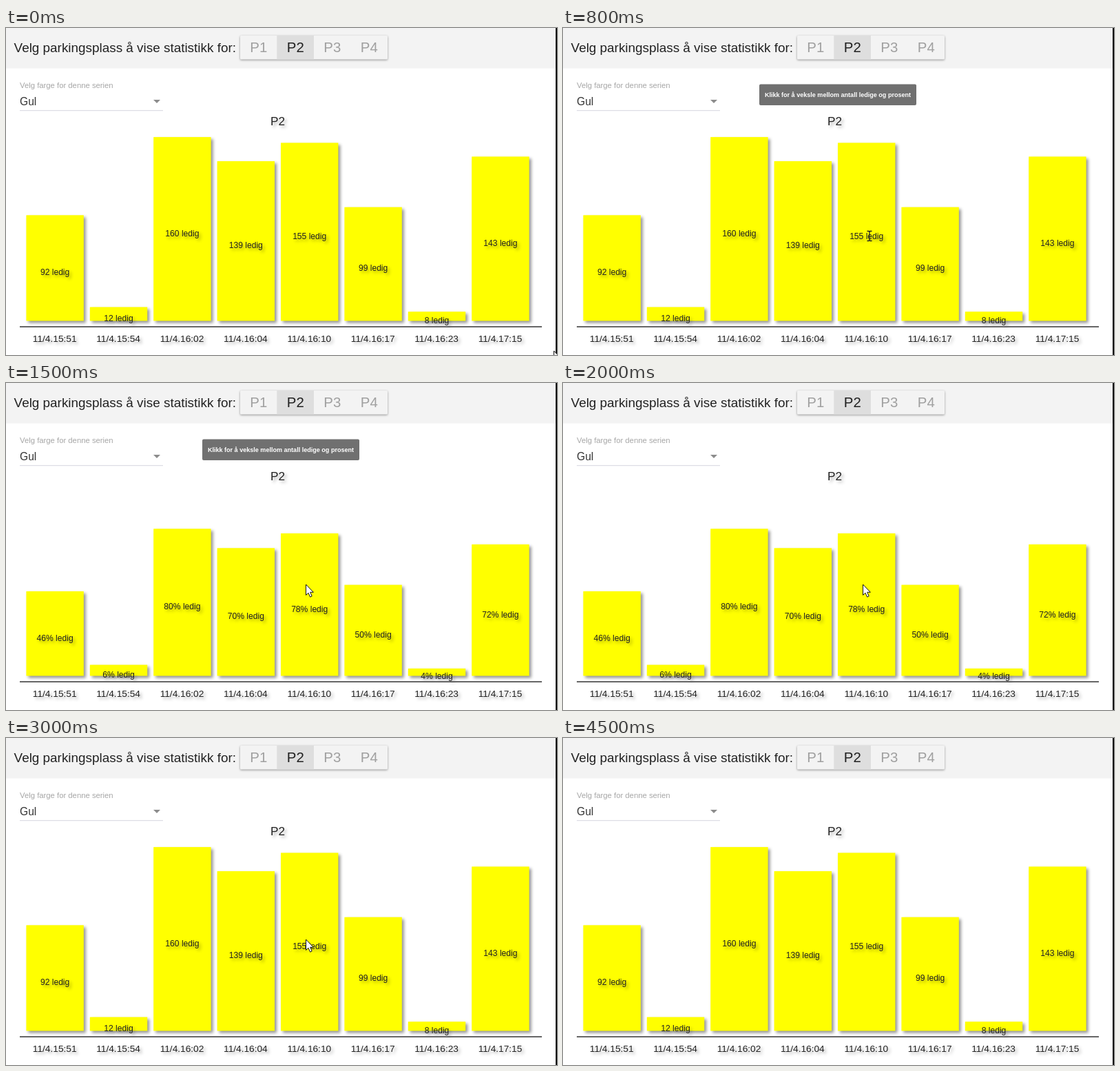
An HTML page that plays this animation: 800 by 474 pixels, repeating every 4600 ms.

```html
<!DOCTYPE html>
<html lang="no">
<head>
<meta charset="utf-8">
<title>Parkeringsstatistikk</title>
<style>
  html, body { margin: 0; width: 100%; height: 100%; overflow: hidden; background: #fff; }
  svg { display: block; font-family: "Liberation Sans", Arial, sans-serif; fill: #222; }
  .raised { filter: drop-shadow(0 1.5px 1.5px rgba(0, 0, 0, .4)); }
  .bar { fill: #ff0; filter: drop-shadow(3px 3px 2px rgba(0, 0, 0, .42)); }
  .soft { filter: drop-shadow(3px 3px 2px rgba(0, 0, 0, .32)); }
  .mid { text-anchor: middle; }
</style>
</head>
<body>
<svg id="stage" width="800" height="474" viewBox="0 0 800 474">
  <rect width="800" height="58.5" fill="#f3f3f3"/>
  <text x="11.6" y="35" font-size="18.9">Velg parkingsplass å vise statistikk for:</text>
  <rect class="raised" x="340" y="11" width="214" height="34.5" rx="1.5" fill="#f3f3f3"/>
  <rect x="393.3" y="11" width="53.7" height="34.5" fill="#dedede"/>
  <g id="tabs" class="mid" font-size="20.4"></g>

  <text x="20" y="86.5" font-size="11.3" fill="#a6a6a6">Velg farge for denne serien</text>
  <text x="20" y="111.5" font-size="15.6" fill="#333">Gul</text>
  <path d="M214 104h10l-5 5z" fill="#8c8c8c"/>
  <rect x="20" y="119" width="208" height="1.2" fill="#dcdce4"/>

  <text class="mid soft" x="394.5" y="140.5" font-size="17.2">P2</text>
  <g id="chart" class="mid"></g>
  <rect x="20" y="432.2" width="758" height="1.8" fill="#555"/>

  <g id="tip">
    <rect x="285" y="81.5" width="228" height="30.5" rx="2" fill="#616161" fill-opacity=".9"/>
    <text class="mid" x="399" y="100" font-size="9.05" font-weight="bold" fill="#fff">Klikk for å veksle mellom antall ledige og prosent</text>
  </g>
  <rect x="798" width="2" height="474" fill="#151515"/>
  <path id="arrow" d="M.5 0V15.5L4 12.3L6.6 18.2L9.2 17L6.7 11.3H11.3Z" fill="#fff" stroke="#111" stroke-linejoin="round"/>
  <path id="beam" d="M441.5 294.5H444L445 295.5L446 294.5H448.5M445 295.5V307.5M441.5 308.5H444L445 307.5L446 308.5H448.5" fill="none" stroke="#222" stroke-width="1.3"/>
</svg>
<script>
const LOOP = 4600, STEP = 100, BASE = 424.5;
const CLICKS = [1500, 3000];
const HOME = [435, 292], ENTRY = [795, 468], EXIT = [620, 492];
const FREE = [92, 12, 160, 139, 155, 99, 8, 143];
const TIMES = ["15:51", "15:54", "16:02", "16:04", "16:10", "16:17", "16:23", "17:15"];

const $ = id => document.getElementById(id);
const ramp = (t, a, b) => Math.min(1, Math.max(0, (t - a) / (b - a)));
const within = (t, a, b) => t >= a && t < b;

function add(parent, tag, attrs, text = "") {
  const node = document.createElementNS("http://www.w3.org/2000/svg", tag);
  for (const key in attrs) node.setAttribute(key, attrs[key]);
  node.textContent = text;
  return parent.appendChild(node);
}

["P1", "P2", "P3", "P4"].forEach((name, i) =>
  add($("tabs"), "text", { x: 366.8 + 53.5 * i, y: 35, fill: i === 1 ? "#222" : "#a0a0a0" }, name));

const bars = FREE.map((free, i) => {
  const left = 29.4 + 92.4 * i, x = left + 41.7;
  const rect = add($("chart"), "rect", { class: "bar", x: left, width: 83.4 });
  const label = add($("chart"), "text", { class: "soft", x, "font-size": 12.1 });
  add($("chart"), "text", { class: "soft", x: x - .4, y: 455.3, "font-size": 13.7 }, "11/4." + TIMES[i]);
  return { free, rect, label };
});

function showBars(percent) {
  for (const { free, rect, label } of bars) {
    const height = free * (percent ? 1.3325 : 1.665);
    rect.setAttribute("y", BASE - height);
    rect.setAttribute("height", height);
    label.setAttribute("y", BASE - height / 2 + 10.3);
    label.textContent = (percent ? Math.round(free / 2) + "%" : free) + " ledig";
  }
}

function showPointer(t) {
  const beam = within(t, 600, CLICKS[0]) || within(t, 3100, 3500);
  const arriving = t < 600;
  const from = arriving ? ENTRY : HOME, to = arriving ? HOME : EXIT;
  const k = arriving ? 1 - (1 - ramp(t, 0, 500)) ** 2 : ramp(t, 3400, 3700);
  const [x, y] = from.map((v, i) => v + (to[i] - v) * k);
  $("arrow").setAttribute("transform", `translate(${x} ${y})`);
  $("arrow").style.display = beam || t >= 3700 ? "none" : "";
  $("beam").style.display = beam ? "" : "none";
}

function draw(now) {
  const t = Math.floor(now % LOOP / STEP) * STEP;
  showBars(within(t, ...CLICKS));
  showPointer(t);
  $("tip").style.opacity = ramp(t, 600, 750) - ramp(t, 1500, 1650) + ramp(t, 3050, 3200) - ramp(t, 3500, 3650);
}

const start = performance.now();
function tick() {
  draw(performance.now() - start);
  requestAnimationFrame(tick);
}
tick();
</script>
</body>
</html>
```
